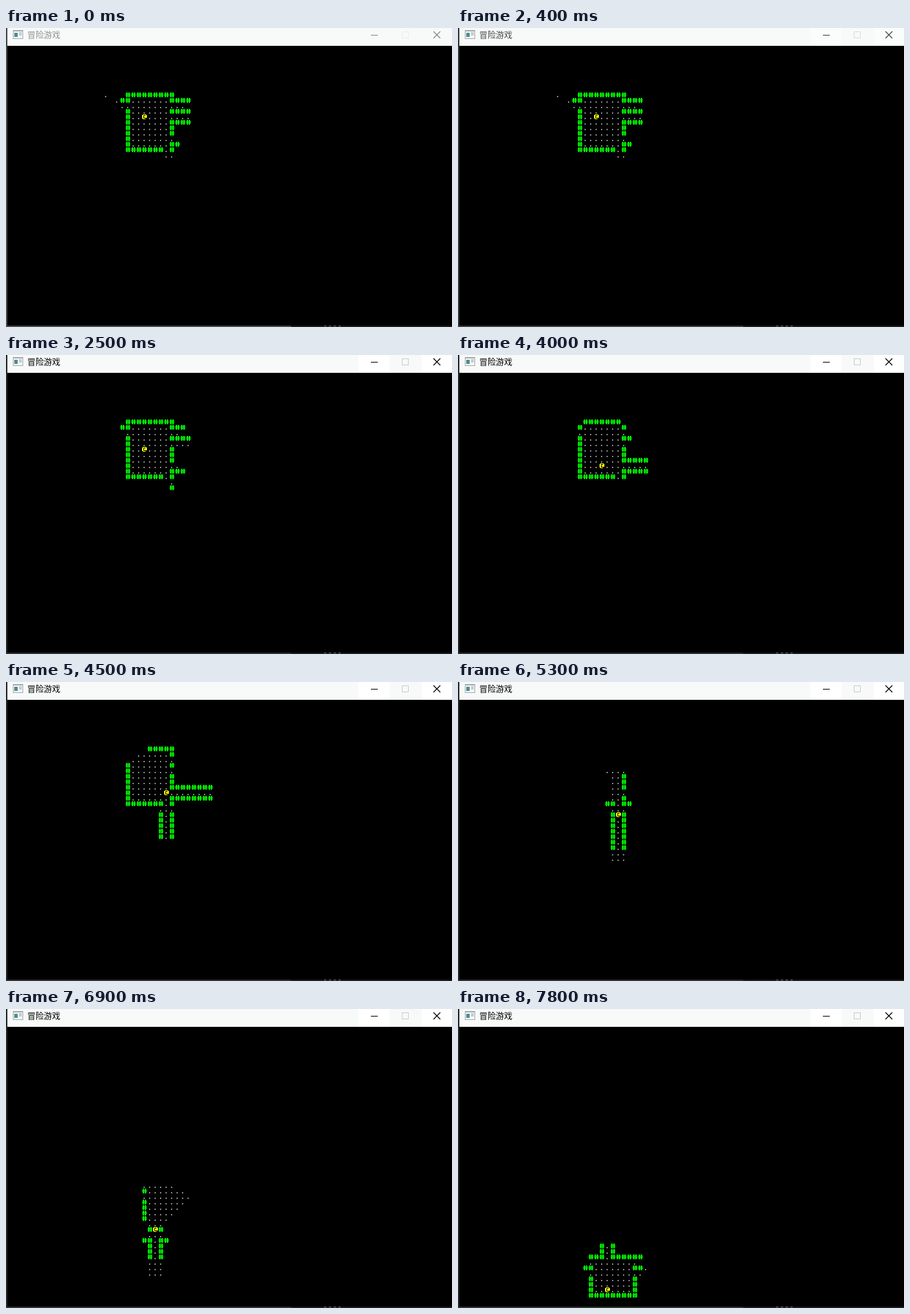
Animation, 649 px wide and 436 px high, one loop 8000 ms. Source, as an HTML page with a canvas:

```html
<!DOCTYPE html>
<html lang="zh">
<head>
<meta charset="utf-8">
<style>
  html, body { margin: 0; width: 100%; height: 100%; overflow: hidden; background: #000; }
  canvas { display: block; }
</style>
</head>
<body>
<canvas id="stage" width="649" height="436"></canvas>
<script>
const ctx = document.getElementById('stage').getContext('2d');
const LOOP = 8000, TICK = 100, CELL = 8, OFFSET = 6, RANGE = 8;

// ---- Map: solid rock with rooms and corridors carved out ----
const floor = new Set();
const key = (x, y) => x + ',' + y;

function carve(x1, y1, x2, y2) {
  for (let y = y1; y <= y2; y++)
    for (let x = x1; x <= x2; x++) floor.add(key(x, y));
}
const hall = (y, x1, x2) => carve(x1, y, x2, y);
const shaft = (x, y1, y2) => carve(x, y1, x, y2);

// Rooms on the hero's way
carve(22, 12, 28, 20);
carve(25, 30, 32, 38);
carve(24, 45, 30, 50);
// Western neighbours
carve(12, 8, 19, 14);
carve(14, 27, 23, 37);
carve(14, 40, 21, 49);
// Passages
shaft(28, 21, 29);
shaft(26, 39, 44);
shaft(33, 42, 48);
hall(13, 20, 37);
hall(15, 22, 37);
hall(19, 22, 37);
hall(22, 26, 30);
hall(31, 24, 38);
hall(33, 24, 25);
hall(40, 24, 28);
hall(45, 22, 33);
hall(47, 22, 33);

// ---- Keys: a held key steps once, pauses, then repeats ----
const REPEAT_DELAY = 490, REPEAT_RATE = 0.0285;
const START = [24, 15];
const press = (time, dx, dy, cells = 1) => ({ time, dx, dy, cells });
const presses = [
  ...[2500, 3300, 3500, 3700].map(time => press(time, 0, 1)),
  press(3905, 1, 0, 4),
  press(4711, 0, 1, 19),
  ...[6500, 6700].map(time => press(time, -1, 0)),
  press(6861, 0, 1, 12)
];

function heroAt(t) {
  let [x, y] = START;
  for (const { time, dx, dy, cells } of presses) {
    if (t < time) break;
    const held = t - time - REPEAT_DELAY;
    const repeats = held < 0 ? 0 : 1 + Math.floor(held * REPEAT_RATE);
    const steps = Math.min(cells, 1 + repeats);
    x += dx * steps;
    y += dy * steps;
  }
  return [x, y];
}

// ---- Field of view: recursive shadow casting in eight octants ----
function visibleCells(px, py) {
  const seen = new Map();

  function scan(place, depth, start, end) {
    if (start < end) return;
    for (let d = depth; d <= RANGE; d++) {
      let blocked = false, next = start;
      for (let k = d; k >= 0; k--) {
        if ((k - 0.5) / d > start) continue;
        if ((k + 0.5) / d < end) break;
        const [x, y] = place(d, k), id = key(x, y), isWall = !floor.has(id);
        if (Math.hypot(d, k) < RANGE + 0.7) seen.set(id, [x, y, isWall]);
        if (isWall) {
          if (!blocked) scan(place, d + 1, start, (k + 0.5) / (d - 0.5));
          blocked = true;
          next = (k - 0.5) / (d + 0.5);
        } else if (blocked) {
          blocked = false;
          start = next;
        }
      }
      if (blocked) break;
    }
  }

  for (const sx of [-1, 1])
    for (const sy of [-1, 1]) {
      scan((d, k) => [px + sx * d, py + sy * k], 1, 1, 0);
      scan((d, k) => [px + sx * k, py + sy * d], 1, 1, 0);
    }
  return [...seen.values()];
}

// ---- Drawing ----
function rect(color, x, y, w, h) {
  ctx.fillStyle = color;
  ctx.fillRect(x, y, w, h);
}

function inCell(col, row, draw) {
  ctx.save();
  ctx.translate(col * CELL + OFFSET, row * CELL + OFFSET);
  draw();
  ctx.restore();
}

function wallGlyph() {
  for (const x of [1, 4]) rect('#0f0', x, 0, 2, 7);
  for (const y of [2, 4]) rect('#0f0', 0, y, 7, 1);
}

function floorGlyph() {
  rect('#808080', 2, 5, 2, 2);
}

function heroGlyph() {
  rect('#ff0', 1, 0, 5, 7);
  rect('#ff0', 0, 1, 7, 5);
  rect('#000', 2, 1, 3, 5);
  rect('#ff0', 3, 2, 3, 3);
  rect('#000', 5, 5, 2, 1);
  rect('#000', 5, 6, 1, 1);
}

function drawMap(px, py) {
  for (const [x, y, isWall] of visibleCells(px, py))
    inCell(x, y, isWall ? wallGlyph : floorGlyph);
  inCell(px, py, heroGlyph);
}

function drawWindow(focus) {
  const gray = (from, to) => {
    const v = Math.round(from + (to - from) * focus);
    return `rgb(${v},${v},${v})`;
  };
  rect('#000', 0, 0, 649, 436);
  rect(gray(72, 40), 0, 0, 2, 436);
  rect(gray(72, 48), 0, 434, 415, 2);
  rect('#1c1c1c', 415, 434, 234, 2);
  for (let x = 463; x < 490; x += 7) rect('#777', x, 434, 3, 1);

  rect('#f7faf9', 2, 0, 647, 26);
  ctx.globalAlpha = focus;
  rect('#fff', 513, 0, 45, 26);
  rect('#fff', 605, 0, 44, 26);
  ctx.globalAlpha = 1;

  rect('#a8acb0', 10, 3, 15, 13);
  rect('#f4f6f8', 11, 5, 13, 10);
  rect('#4d8f8c', 12, 7, 5, 6);
  rect('#c4ccd4', 19, 6, 4, 5);

  ctx.fillStyle = gray(145, 0);
  ctx.font = '12px "Noto Sans CJK SC", "Noto Sans CJK", sans-serif';
  ctx.textBaseline = 'middle';
  ctx.fillText('冒险游戏', 31, 10);

  rect(gray(135, 0), 531, 10, 10, 1);
  ctx.lineWidth = 1;
  ctx.strokeStyle = gray(236, 204);
  ctx.strokeRect(576.5, 5.5, 9, 9);
  ctx.lineWidth = 1.2;
  ctx.strokeStyle = gray(135, 0);
  ctx.beginPath();
  for (const side of [-5, 5]) {
    ctx.moveTo(627 - side, 5);
    ctx.lineTo(627 + side, 15);
  }
  ctx.stroke();
}

function frame() {
  const t = Math.floor(performance.now() % LOOP / TICK) * TICK;
  const focus = Math.max(0, Math.min(1, (t - TICK) / 600));
  drawWindow(focus);
  drawMap(...heroAt(t));
  requestAnimationFrame(frame);
}
frame();
</script>
</body>
</html>
```
